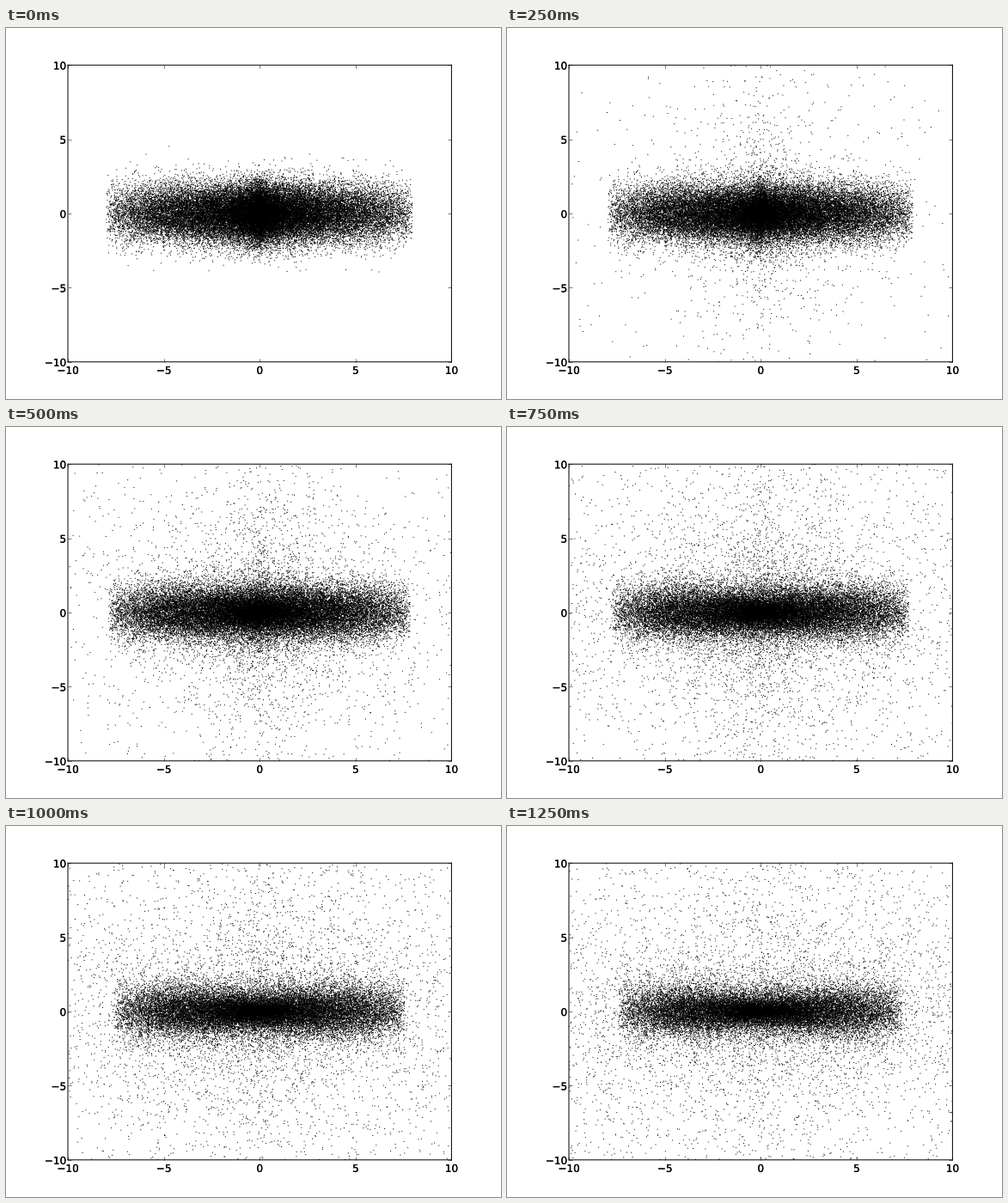
Animation of 576 by 432 pixels, one loop 1.5 s. Source, as a matplotlib script:

```python
import numpy as np
import matplotlib.pyplot as plt
from matplotlib import patheffects
from matplotlib.animation import FuncAnimation

STEPS = 6
COUNT = 40000
RADIUS = 8.0
GRAVITY = 2.56    # strength of the central mass, one step as unit of time

plt.rcParams.update({
    "font.family": "DejaVu Sans",
    "font.size": 12,
    "axes.linewidth": 1.0,
    "path.snap": False,
})


def make_disk(rng):
    """Stars spread evenly in radius, with a normal spread in height."""
    r = rng.uniform(0, RADIUS, COUNT)
    angle = rng.uniform(0, 2 * np.pi, COUNT)
    return np.array([r * np.cos(angle), r * np.sin(angle),
                     rng.normal(0, 1, COUNT)])


def simulate(pos):
    """Let the stars fall from rest; yield the edge-on view of each step."""
    vel = np.zeros_like(pos)
    for _ in range(STEPS):
        yield pos[[0, 2]].T
        vel = vel - GRAVITY * pos / np.linalg.norm(pos, axis=0) ** 3
        pos = pos + vel


def in_view(xy):
    return xy[(np.abs(xy) < 10).all(axis=1)]


views = [in_view(xy) for xy in simulate(make_disk(np.random.default_rng(7)))]

fig = plt.figure(figsize=(8, 6), dpi=72, facecolor="white")
ax = fig.add_axes([0.125, 0.1, 0.775, 0.8])
ax.set(xlim=(-10, 10), ylim=(-10, 10),
       xticks=range(-10, 11, 5), yticks=range(-10, 11, 5))
ax.tick_params(direction="in", top=True, right=True, length=4, width=0.5)
ax.tick_params(axis="x", pad=4)
ax.tick_params(axis="y", pad=2)

# Outlined labels keep their exact sub-pixel place.
for label in ax.get_xticklabels() + ax.get_yticklabels():
    label.set_path_effects([patheffects.withStroke(linewidth=0.2,
                                                   foreground="black")])

# Two sizes, so that each star is drawn at its exact place, not on whole pixels.
stars = ax.scatter([0, 0], [0, 0], s=[1, 1], marker="s", color="black",
                   linewidths=0)


def update(step):
    stars.set_offsets(views[step])
    return stars,


anim = FuncAnimation(fig, update, frames=STEPS, interval=250,
                     repeat=True, repeat_delay=0, blit=False)
plt.show()
```
